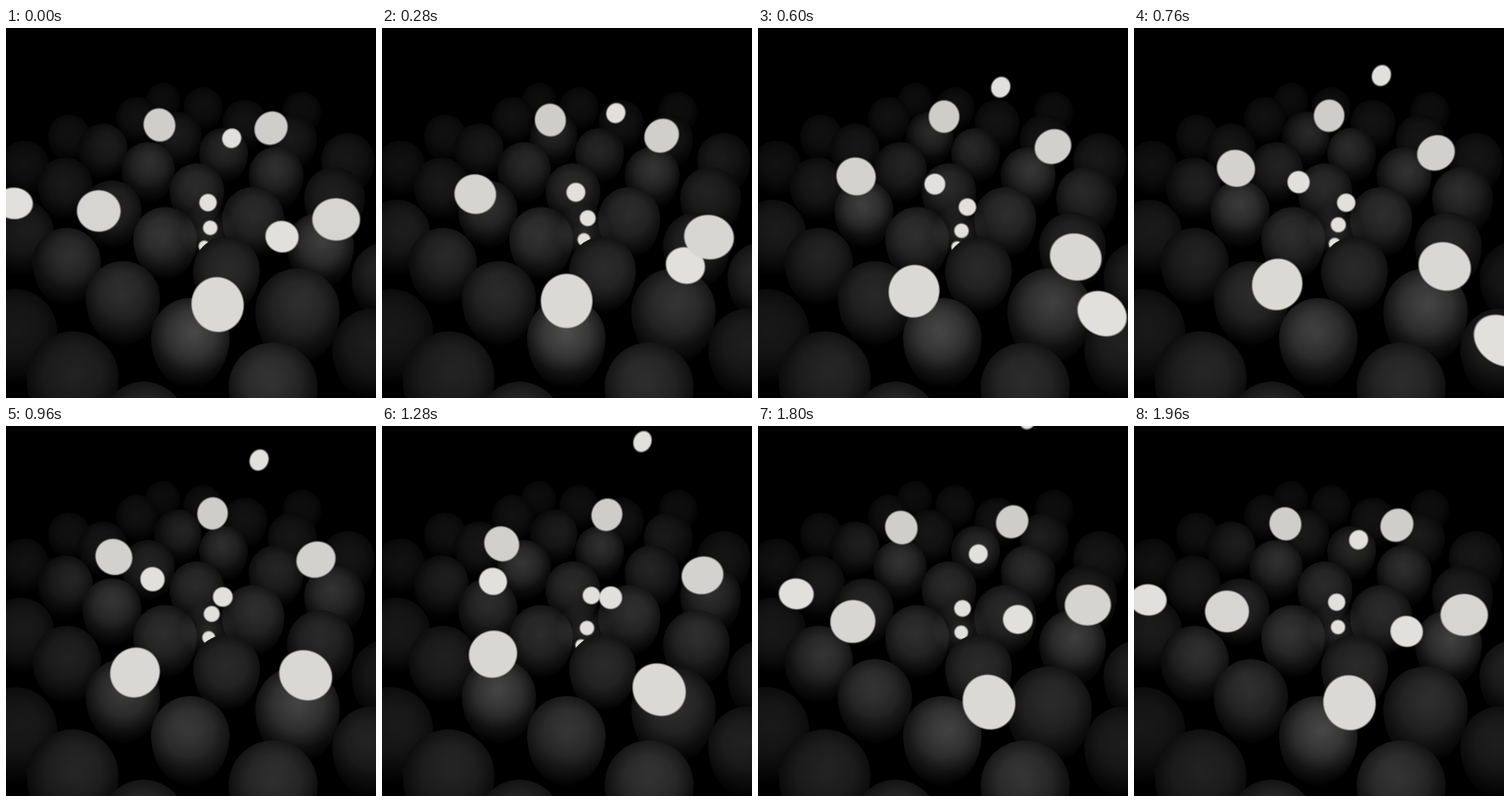
These frames come from a looping animation (500 px wide and 500 px high, 2 s). An HTML page with a canvas:

```html
<!DOCTYPE html>
<html lang="en">
<head>
<meta charset="utf-8">
<title>Orbiting lights</title>
<style>
html, body { margin: 0; width: 100%; height: 100%; overflow: hidden; background: #000; }
canvas { display: block; width: 100vw; height: 100vh; }
</style>
</head>
<body>
<canvas id="stage" width="500" height="500"></canvas>
<script>
const ctx = document.getElementById('stage').getContext('2d');
const LOOP = 2000, STEP = 40, FOCAL = 372;
const { hypot, exp, sqrt, cos, sin, atan2, PI, min, max, floor } = Math;

// Dark pillars, far to near: x, y, radius of the rounded top
const pillars = [
  [212, 97, 23], [400, 112, 26], [266, 106, 26], [177, 121, 28], [323, 127, 30],
  [85, 145, 28], [232, 145, 32], [387, 150, 33], [131, 162, 33], [294, 168, 33],
  [462, 178, 36], [25, 185, 33], [192, 190, 36], [365, 198, 37], [80, 212, 37],
  [258, 220, 37], [444, 229, 41], [143, 246, 40], [334, 257, 42], [20, 277, 45],
  [215, 285, 43], [425, 294, 45], [82, 316, 46], [298, 327, 45], [515, 337, 48],
  [158, 365, 50], [394, 382, 57], [12, 410, 57], [249, 418, 53], [495, 433, 54],
  [90, 472, 62], [361, 485, 60], [186, 536, 58]
];
const COVER = 23; // the pillar that hides the lights' origin

// Three outgoing paths: x, y, radius at successive key times
const keyTimes = [0, 280, 600, 960, 1280, 1600];
const keyTime = i => floor(i / 6) * LOOP + keyTimes[i % 6];
const arms = [
  { first: 0, points: [[268, 295, 8], [273, 286, 9], [275, 274, 10], [278, 254, 11],
    [283, 229, 12], [291, 196, 12.7], [305, 149, 13], [316, 115, 13], [328, 80, 13],
    [342, 46, 12.8], [352, 21, 12.3], [361, 3, 12], [369, -22, 11]] },
  { first: 2, points: [[269, 296, 8], [274, 286, 9], [277, 273, 10], [278, 257, 11],
    [273, 236, 12], [262, 222, 13], [239, 211, 14.3], [198, 207, 16.5], [150, 210, 18.5],
    [91, 218, 20.5], [11, 237, 21.5], [-50, 252, 23]] },
  { first: 4, points: [[269, 296, 8], [273, 287, 9], [276, 270, 10], [278, 257, 11],
    [283, 242, 12], [293, 231, 13.5], [309, 232, 15.5], [332, 245, 18], [373, 282, 21.5],
    [410, 321, 24.5], [465, 386, 29], [540, 470, 36]] }
];

const smooth = (a, b, v) => {
  const u = max(0, min(1, (v - a) / (b - a)));
  return u * u * (3 - 2 * u);
};
const gray = v => `rgb(${v},${v},${v})`;

function pathPoint({ first, points }, time) {
  const at = i => keyTime(first + i), last = points.length - 1;
  if (time < at(0) || time >= at(last)) return null;
  let i = 0;
  while (time >= at(i + 1)) i++;
  const h = at(i + 1) - at(i), u = (time - at(i)) / h;
  const slope = (j, axis) => {
    const a = max(0, j - 1), b = min(last, j + 1);
    return (points[b][axis] - points[a][axis]) / (at(b) - at(a));
  };
  const [x, y, r] = [0, 1, 2].map(axis => {
    const p = points[i][axis], q = points[i + 1][axis];
    const m = slope(i, axis) * h, n = slope(i + 1, axis) * h;
    return p + u * (m + u * (3 * (q - p) - 2 * m - n + u * (2 * (p - q) + m + n)));
  });
  return { x, y, r, tone: 225, young: time - at(0) < 1000 };
}

// Circle on the ground seen in perspective
function ringPoint(turn) {
  const a = turn * 2 * PI, c = cos(a), s = sin(a);
  const w = 1 + .215 * c + .1445 * s;
  return {
    x: (283.61 - 31.64 * c + 165.47 * s) / w,
    y: (212.88 - 53.69 * c - 35.14 * s) / w,
    r: 26.2 / w,
    tone: 237 - 25 * w
  };
}

function radial(x, y, r, stops) {
  const g = ctx.createRadialGradient(x, y, 0, x, y, r);
  stops.forEach(([offset, color]) => g.addColorStop(offset, color));
  return g;
}

function drawPillar([x, y, r], lights) {
  const fog = exp(-.6 * ((x - 270) / 260) ** 2 - .75 * (min(0, y - 300) / 170) ** 2);
  const base = 42 * fog;
  ctx.beginPath();
  ctx.arc(x, y, r, PI, 0);
  ctx.ellipse(x, y, r, r * 1.3, 0, 0, PI);
  ctx.fillStyle = radial(x, y - r * .05, r * 1.35,
    [[0, gray(base)], [.45, gray(base * .82)], [.72, gray(base * .42)], [1, '#000']]);
  ctx.fill();
  ctx.globalCompositeOperation = 'lighter';
  for (const light of lights) {
    const dx = light.x - x, dy = light.y - y, d = hypot(dx, dy) / r;
    const power = 45 * sqrt(fog) * smooth(.2, 1, -dy / r) * exp(-.5 * (d / 1.5) ** 2);
    if (power < 1) continue;
    ctx.fillStyle = radial(x + dx * .2, y + dy * .2, r * 1.1,
      [[0, gray(power)], [.5, gray(power * .6)], [1, '#000']]);
    ctx.fill();
  }
  ctx.globalCompositeOperation = 'source-over';
}

function drawGlow() {
  ctx.globalCompositeOperation = 'lighter';
  ctx.fillStyle = radial(273, 276, 38, [[0, gray(42)], [.5, gray(20)], [1, '#000']]);
  ctx.fillRect(233, 236, 80, 80);
  ctx.globalCompositeOperation = 'source-over';
}

// Wide-angle view stretches each ball away from the centre
function drawBall({ x, y, r, tone }) {
  const dx = x - 250, dy = y - 250;
  const rgb = `${tone},${tone - 1},${tone - 4}`;
  const soft = 1.2 / r;
  ctx.save();
  ctx.translate(x, y);
  ctx.rotate(atan2(dy, dx));
  ctx.scale(sqrt(1 + (dx * dx + dy * dy) / FOCAL ** 2), 1);
  ctx.fillStyle = radial(0, 0, r + 1,
    [[0, `rgb(${rgb})`], [1 - 2 * soft, `rgb(${rgb})`], [1, `rgba(${rgb},0)`]]);
  ctx.beginPath();
  ctx.arc(0, 0, r + 1, 0, 2 * PI);
  ctx.fill();
  ctx.restore();
}

function draw(time) {
  const ring = [0, 1, 2, 3, 4].map(i => ringPoint((time / LOOP + i) / 5));
  const sparks = arms.flatMap(arm =>
    [0, 1, 2].map(i => pathPoint(arm, time + i * LOOP)).filter(Boolean));
  ctx.fillStyle = '#000';
  ctx.fillRect(0, 0, 500, 500);
  pillars.forEach((pillar, i) => {
    if (i === COVER) {
      drawGlow();
      sparks.filter(s => s.young).forEach(drawBall);
    }
    drawPillar(pillar, ring);
  });
  sparks.filter(s => !s.young).forEach(drawBall);
  ring.sort((a, b) => a.r - b.r).forEach(drawBall);
}

const start = performance.now();
function tick() {
  const time = (performance.now() - start) % LOOP;
  draw(floor(time / STEP) * STEP);
  requestAnimationFrame(tick);
}
tick();
</script>
</body>
</html>
```
